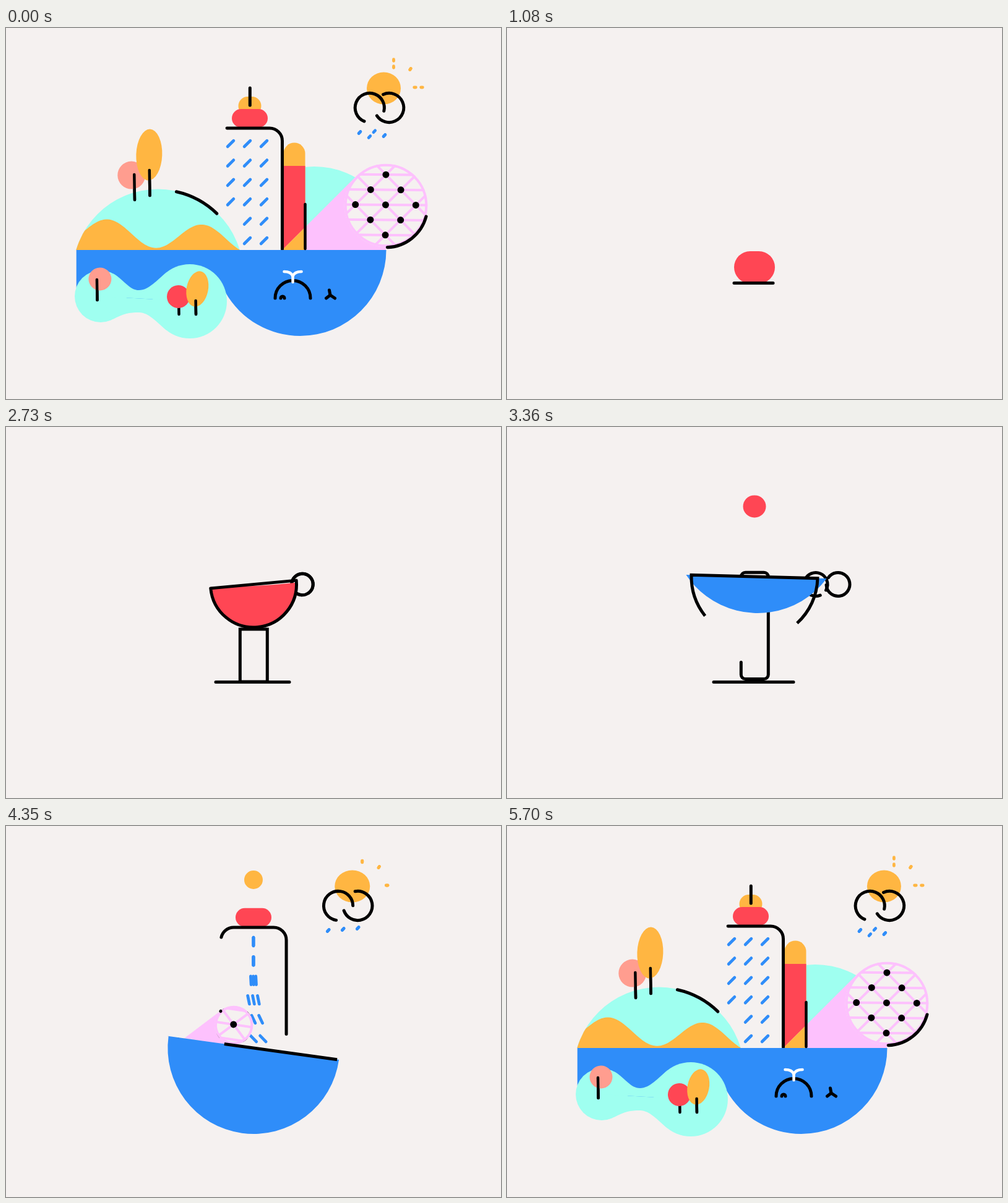
Recreate the animation shown at these times as an HTML page with a canvas. Size 800 by 600 pixels, loop 5730 ms.

```html
<!DOCTYPE html>
<html lang="en">
<head>
<meta charset="utf-8">
<title>Island loop</title>
<style>
  html, body { margin: 0; width: 100%; height: 100%; overflow: hidden; background: #f5f1f0; }
  canvas { display: block; width: 800px; height: 600px; }
</style>
</head>
<body>
<canvas id="stage" width="800" height="600"></canvas>
<script>
const ctx = document.getElementById('stage').getContext('2d');
const LOOP = 5730, PI = Math.PI, TAU = 2 * PI, SEA = 359, HULL = 139;
const BG = '#f5f1f0', BLUE = '#2f8df9', MINT = '#9ffff0', ORANGE = '#ffb642',
      RED = '#ff4654', PINK = '#fdc1fd', SALMON = '#ff9d8f', BLACK = '#000';

// The landscape leaves after the loop point, so its clock runs from 1200 to LOOP + 1200.
let t = 0, spread = 0, settle = 0;

const rad = d => d * PI / 180;
const clamp = (v, a = 0, b = 1) => Math.min(b, Math.max(a, v));
const mix = (a, b, p) => a + (b - a) * p;
const inOut = p => (1 - Math.cos(PI * p)) / 2;
const easeIn = p => p * p;
const easeOut = p => 1 - (1 - p) ** 2;

const ramp = (from, to, ease = inOut) => ease(clamp((t - from) / (to - from)));
// Grows in between two times, shrinks out between two times after the loop point
const shown = (in0, in1, out0, out1) => ramp(in0, in1) - ramp(LOOP + out0, LOOP + out1);
// Landscape poses: start, spread out, settled
const pose = (a, b, c) => mix(mix(a, b, spread), c, settle);
const swing = (start, amp, fade, period) => t < start ? 0
  : amp * Math.exp((start - t) / fade) * Math.cos(TAU * (t - start) / period);

// Value of a short track [time, value, time, value, ...]
function key(track) {
  let v = track[1];
  for (let i = 2; i < track.length; i += 2)
    v = mix(v, track[i + 1], ramp(track[i - 2], track[i]));
  return v;
}

function fill(color, draw) {
  ctx.beginPath(); draw(); ctx.fillStyle = color; ctx.fill();
}
function stroke(color, width, draw, cap = 'round') {
  ctx.beginPath(); draw();
  ctx.strokeStyle = color; ctx.lineWidth = width; ctx.lineCap = cap; ctx.stroke();
}
function line(color, width, x0, y0, x1, y1) {
  stroke(color, width, () => { ctx.moveTo(x0, y0); ctx.lineTo(x1, y1); });
}
// Dash centred on a point
function dash(color, x, y, dx, dy) { line(color, 4.8, x - dx, y - dy, x + dx, y + dy); }
function oval(color, x, y, rx, ry = rx, rot = 0) {
  if (rx > 0 && ry > 0) fill(color, () => ctx.ellipse(x, y, rx, ry, rot, 0, TAU));
}
function pill(color, x, y, w, h) {
  fill(color, () => ctx.roundRect(x - w / 2, y - h / 2, w, h, Math.min(w, h) / 2));
}
function group(draw) { ctx.save(); draw(); ctx.restore(); }
function clipped(path, draw) {
  group(() => { ctx.beginPath(); path(); ctx.clip(); draw(); });
}
function at(x, y, scale, draw) {
  if (scale <= 0.001) return;
  group(() => { ctx.translate(x, y); ctx.scale(scale, scale); draw(); });
}

// Disc below a tilted chord
function segment(color, x, y, r, tilt, level, bulge = 0) {
  group(() => {
    ctx.translate(x, y); ctx.rotate(rad(tilt));
    const a = Math.asin(clamp(level / r, -1, 1));
    fill(color, () => {
      ctx.arc(0, 0, r, a, PI - a);
      ctx.quadraticCurveTo(0, level - 2 * bulge, r * Math.cos(a), level);
    });
  });
}

// The glass swings to rest, then rocks as a boat
const tilt = () => swing(1850, 200, 250, 1534)
  + 7.9 * Math.cos(TAU * (t - 4350) / 900) * (ramp(3000, 4350) - ramp(4350, 4850));
const chordY = () => 254.5 - 12.5 * ramp(3100, 3360) + 117 * ramp(3360, 3700);

function cloud() {
  if (t < 2450 || t > LOOP + 600) return;
  const lift = ramp(3360, 3640), apart = ramp(3000, 3360);
  const x = (t < 4350 ? key([3000, 479, 3360, 517, 3520, 610, 4350, 552.7])
    : 552.7 + 0.0368 * (t - 4350)) + 65 * ramp(LOOP, LOOP + 580, easeIn);
  const r = 19 * ramp(2450, 2800) + 4.6 * lift;
  const gap = 18 * apart - 2.3 * lift;
  const sway = -24 * Math.cos(TAU * (t - 4890) / 1680);
  const sweep = rad(mix(322, 261, lift));
  const ring = (dx, turn) => stroke(BLACK, 5, () => ctx.arc(dx, 0, r, rad(turn), rad(turn) + sweep));

  at(x, mix(254.5, 129, lift), 1 - ramp(LOOP + 400, LOOP + 600, easeIn), () => {
    const sun = ramp(3600, 3900);
    at(7, -31.5, sun, () => {
      oval(ORANGE, 0, 0, pose(28.5, 30, 27.5), 26);
      // Each ray parts into two dashes and joins again
      const ray = (x, y, dx, dy, start, time) => {
        const part = 5.5 * Math.sin(PI * clamp((t - start) / time));
        for (const s of [-part, part]) dash(ORANGE, x + dx * s, y + dy * s, dx * 1.3, dy * 1.3);
      };
      ray(16, -40, 0, -1, 4890, 1680);
      ray(43, -31, 0.57, -0.82, 4350, 1100);
      ray(56, -1.5, 1, 0, 4890, 1680);
    });
    ring(-gap, 88 + sway);
    ring(gap, -90 - sway - 75 * (1 - lift));
    for (let i = 0; i < 3; i++) {
      const start = 5900 - 700 * i;
      for (const wait of [0, 500]) {
        const drop = 12 * ramp(start + wait, start + wait + 300);
        if (sun > 0) dash(BLUE, -32 + 24 * i - drop * 0.67, 40 - 2 * i + drop * 0.75, -1.3 * sun, 1.4 * sun);
      }
    }
  });
}

function ball() {
  const x = t < LOOP ? pose(400, 395, 394) : mix(394, 400, ramp(LOOP + 630, LOOP + 1000));
  const dome = shown(3950, 4200, 300, 500);
  if (dome > 0) {
    const y = key([3950, 148, 4200, 82, 4350, 87, 4650, 126, LOOP + 300, 126, LOOP + 500, 146]);
    pill(ORANGE, x, y, (30 + 7 * ramp(4400, 4650)) * dome, 30 * dome);
  }
  if (t < 1970) {
    const free = ramp(1200, 1300), hop = (t - 1815) / (t < 1815 ? 615 : 200);
    pill(RED, 400, 60 + 327 * hop * hop, 66 - 2 * free, 52 + 12 * free);
  } else if (t > 2850) {
    const grow = ramp(2850, 3000), flat = ramp(3800, 4050);
    const fall = ramp(LOOP + 600, LOOP + 900, easeIn);
    const y = key([2850, 250, 3000, 184, 3700, 78, 4050, 148.5, 4890, 146]);
    pill(RED, x, mix(y, 387, fall), mix(37 * grow + 21 * flat, 66, fall), mix(36 * grow - 6 * flat, 52, fall));
  }
  const mast = shown(4650, 4850, 200, 400);
  if (mast > 0) line(BLACK, 5, x + 0.3, 125, x + 0.3, 125 - 28 * mast);
}

// Stem of the glass, later the outline of the tower
function tower() {
  if (t < 1750 || t > LOOP + 620) return;
  const round = ramp(3100, 3360), widen = ramp(3360, 3700);
  const x = pose(400.3, 392.6, 391.8), half = mix(22, pose(52.8, 54.5, 54.7), widen);
  const x0 = x - half, x1 = x + half;
  const top = 412 - 85 * ramp(1750, 1950) - 163 * ramp(3080, 3600) - 2 * spread;
  const low = mix(412 - 4.5 * round, SEA, widen);
  const r = 7 * round + 13.5 * widen, rLow = 7 * round * (1 - widen);
  const rise = Math.min(27, (low - top) / 2);
  // The line is trimmed at both ends of its path
  const skip = 110 * round + 42 * widen + 29 * spread + 280 * ramp(LOOP + 250, LOOP + 620);
  const tail = (x1 - x0 + rise) * ramp(3400, 3700) + 23 * widen - 21 * spread;
  const length = 2 * (low - top + x1 - x0) - (4 - PI) * (r + rLow);
  const seen = length - skip - tail;
  if (seen <= 0) return;
  group(() => {
    if (round > 0) { ctx.setLineDash([seen, 9999]); ctx.lineDashOffset = -skip; }
    stroke(BLACK, 5, () => {
      ctx.moveTo(x0, low - rise);
      ctx.arcTo(x0, top, x1, top, r);
      ctx.arcTo(x1, top, x1, low, r);
      ctx.arcTo(x1, low, x0, low, rLow);
      ctx.arcTo(x0, low, x0, low - rise, rLow);
      ctx.lineTo(x0, low - rise);
    });
  });
}

function windows() {
  const cx = pose(400, 391, 390);
  for (let row = 0; row < 6; row++) {
    const size = 6.8 * shown(3700 + row * 50, 3850 + row * 50, 200 + row * 40, 380 + row * 40);
    if (size < 0.05) continue;
    const p = clamp((t - 4405 + row * 60) / 430), a = rad(-90 - 135 * p * p);
    for (let col = row > 3 ? 0 : -1; col < 2; col++)
      dash(BLUE, cx + col * 27 * p, 187 + row * 31.4, size * Math.cos(a), size * Math.sin(a));
  }
}

// Right hill, thin tower, cone and lattice disc
function rightSide() {
  clipped(() => ctx.rect(449, 0, 115, SEA), () =>
    oval(MINT, pose(450, 483, 498), SEA, pose(0, 120, 135)));

  const edge = pose(448, 468.5, 483.5);
  const inBand = draw => clipped(() => ctx.rect(449, 0, 100, SEA), () =>
    clipped(() => ctx.roundRect(edge - 35, 185.5, 35, 200, 17.5), draw));
  inBand(() => {
    ctx.fillStyle = ORANGE; ctx.fillRect(440, 180, 60, 200);
    ctx.fillStyle = RED; ctx.fillRect(440, pose(350, 239, 223), 60, 200);
  });

  const grow = ramp(4130, 4330);
  if (grow <= 0) return;
  const r = pose(31, 67, 67.3) * grow;
  const x = pose(362, 605, 614), y = mix(SEA, pose(327, 287, 287), grow);
  const tip = mix(x, pose(286, 434.5, 446.5), grow);
  const dir = Math.atan2(SEA - y, tip - x);
  const open = Math.acos(clamp(r / Math.hypot(tip - x, SEA - y)));
  const cone = () => {
    ctx.moveTo(tip, SEA);
    ctx.lineTo(x + r * Math.cos(dir + open), y + r * Math.sin(dir + open));
    ctx.lineTo(x, y);
    ctx.lineTo(x, SEA);
  };
  fill(PINK, cone);
  inBand(() => fill(ORANGE, cone));

  oval(BG, x, y, r);
  clipped(() => ctx.arc(x, y, r, 0, TAU), () => {
    const step = 24.4;
    ctx.translate(x - 0.5, y - 1);
    ctx.rotate(rad(0.5));
    for (let i = -2; i <= 2; i++) {
      line(PINK, 4, -80, i * step, 80, i * step);
      for (const s of [-80, 80]) line(PINK, 4, 2 * i * step - s, -80, 2 * i * step + s, 80);
    }
    for (let i = -1; i <= 1; i++)
      for (let j = -1; j <= 1; j++) oval(BLACK, (i + j) * step, (i - j) * step, 5.5);
  });
  stroke(PINK, 4, () => ctx.arc(x, y, Math.max(0, r - 2), 0, TAU));
  const turn = rad(pose(220, 102, 15)), arc = rad(pose(0, 70, 73));
  if (arc > 0) stroke(BLACK, 5, () => ctx.arc(x, y + 0.5, r, turn, turn + arc));
}

// A tree stands on its foot; its crown is placed from there
function tree(color, x, y, height, cx, cy, rx, ry, grow, lean = 0) {
  at(x, y, grow, () => {
    ctx.rotate(rad(pose(1, 1, -1)));
    line(BLACK, 4.5, 0, 0, 0, -height);
    oval(color, cx, cy, rx, ry, rad(lean));
    if (-cy < height * 1.25 || ry > 25) line(BLACK, 4.5, 0, 0, 0, -height);
  });
}

function leftHill() {
  const r = 138, x = pose(300, 267.5, 245.5), y = pose(SEA + r, 402.8, 398.5);
  clipped(() => ctx.rect(0, 0, 800, SEA), () => {
    oval(MINT, x, y, r);
    clipped(() => ctx.arc(x, y, r, 0, TAU), () => fill(ORANGE, () => {
      const first = x - 81, base = y - 68;
      ctx.moveTo(x - r, SEA);
      for (let px = x - r; px <= x + r; px += 3)
        ctx.lineTo(px, base + 0.055 * (px - first) - 21 * Math.cos(TAU * (px - first) / 153));
      ctx.lineTo(x + r, SEA);
    }));
  });
  const from = rad(pose(-100, -84.6, -77.4)), arc = rad(pose(0, 31.5, 31.5));
  if (arc > 0) stroke(BLACK, 5, () => ctx.arc(x, y, r - 1, from, from + arc));

  const grow = shown(4580, 4830, 260, 530);
  tree(SALMON, 230 - 22 * settle, 284 - 6 * settle, 41, -4.5, -40, 22.5, 22.5, grow);
  tree(ORANGE, 254.5 - 22 * settle, 277 - 6 * settle, 41, 0, -66, 21, 41.5, grow, 3);
}

// Half disc with a wavy shelf to its left
function sea() {
  const x = pose(400, 467, 475.5), left = pose(261, 137, 113.7);
  const end = rad(pose(180, 148.9, 150.1));
  const depth = (a, b) => pose(SEA, a, b);
  const crest = [pose(261, 290, 297), depth(387, 436)];
  const waves = [[pose(261, 205, 215), depth(430, 442)], [pose(261, 142, 145), depth(391, 420)]];
  const ex = x + HULL * Math.cos(end), ey = SEA + HULL * Math.sin(end);
  const k = 36 * spread;
  fill(BLUE, () => {
    ctx.moveTo(left, SEA);
    ctx.arc(x, SEA, HULL, 0, end);
    ctx.bezierCurveTo(ex - k * Math.sin(-end + PI), ey - k * Math.abs(Math.cos(end)), crest[0] + k, crest[1], ...crest);
    let [px, py] = crest;
    for (const [wx, wy] of waves) {
      const mid = (px + wx) / 2;
      ctx.bezierCurveTo(mid, py, mid, wy, wx, wy);
      [px, py] = [wx, wy];
    }
    ctx.lineTo(left, py);
  });
}

// One disc that parts into two joined by a waist
function island() {
  at(225, 438, ramp(4520, 4800, easeOut), () => {
    ctx.translate(-225, -438);
    const disc = (x, y, r) => ({ x: mix(225, x, settle), y: mix(438, y, settle), r: mix(49.5, r, settle) });
    const a = disc(153, 434, 42), b = disc(297, 442, 60);
    oval(MINT, a.x, a.y, a.r);
    oval(MINT, b.x, b.y, b.r);
    const wx = mix(225, 215, settle), pull = 20 * settle;
    for (const side of [-1, 1]) fill(MINT, () => {
      const wy = mix(438, 442, settle) + side * mix(48, 18, settle);
      const edge = (d, deg, k) => {
        const c = Math.cos(rad(deg)), s = Math.sin(rad(deg));
        return { x: d.x + d.r * c, y: d.y + side * d.r * s, cx: d.x + d.r * c + k * s, cy: d.y + side * (d.r * s - k * c) };
      };
      const p = edge(a, 62, pull), q = edge(b, 128, -pull);
      ctx.moveTo(a.x, a.y);
      ctx.lineTo(p.x, p.y);
      ctx.bezierCurveTo(p.cx, p.cy, wx - pull * 0.8, wy, wx, wy);
      ctx.bezierCurveTo(wx + pull * 0.8, wy, q.cx, q.cy, q.x, q.y);
      ctx.lineTo(b.x, b.y);
    });
  });
  const grow = shown(4620, 4850, 250, 520);
  tree(SALMON, 200.5 - 53 * settle, 440, 33, pose(1, 1, 5), -34, 18.5, 18.5, grow);
  tree(RED, 230 + 49.5 * settle, 463, 15, -0.5, -28.5, 18.5, 18.5, grow);
  tree(ORANGE, 245 + 62 * settle, 463, 22, 3, -41, 17.5, 29, grow, 12 * settle);
}

function whale() {
  at(463.5, 437, shown(5020, 5350, 250, 500), () => {
    stroke(BLACK, 5, () => ctx.arc(0, 0, 28.5, PI, TAU));
    stroke(BLACK, 5, () => ctx.arc(-16.5, 0, 3, PI, TAU));
    line(BLACK, 5, 59, -13, 60.5, -5);
    line(WHITE, 4.5, 0, -26, 0, -36);
    for (const s of [-1, 1]) {
      line(BLACK, 5, 60.5, -5, 61 + 7 * s, 0);
      stroke(WHITE, 4.5, () => {
        ctx.moveTo(0, -36); ctx.quadraticCurveTo(3 * s, -43, 14 * s, -43);
      });
    }
  });
}
const WHITE = '#fff';

function drink() {
  if (t > 1970 && t < 3150) {
    const pour = ramp(1970, 2040), slosh = swing(1930, 42, 400, 600);
    const drop = swing(2040, 12.5, 120, 420) + (t < 2040 ? 12.5 * pour : 0);
    segment(RED, 400, 254.5 + drop, mix(33, 69, pour), slosh,
      -33 * (1 - pour) + 26 * ramp(2700, 3000) + 43 * ramp(3000, 3150), slosh * 0.65 * pour);
  }
  if (t > 3080 && t < 4350) {
    const level = HULL - 59 * ramp(3080, 3360) - 80 * ramp(3360, 3800);
    const a = rad(tilt()), x = 403 - 3 * ramp(3360, 3700);
    segment(BLUE, x + level * Math.sin(a), chordY() - level * Math.cos(a), HULL, tilt(), level);
  }
}

function rim() {
  if (t < 1850 || t > 4590) return;
  const grow = ramp(3030, 3360), full = ramp(3360, 3700), trim = ramp(2980, 3360), gone = ramp(3360, 3600);
  const r = 69.5 * ramp(1850, 2030) + 32.5 * grow + 36 * full;
  const left = rad(90 - 50 * trim - 40 * gone), right = rad(90 - 44 * trim - 46 * gone);
  const bulge = 8 * (1 - ramp(2040, 2300));
  group(() => {
    ctx.translate(pose(400, 467, 475), chordY());
    ctx.rotate(rad(tilt()));
    ctx.lineJoin = t < 3000 ? 'round' : 'miter';
    stroke(BLACK, 5, () => {
      if (left > 0) ctx.arc(0, 0, r, PI - left, PI);
      else ctx.moveTo(key([3700, -138, 4350, -48, 4600, 135]), 0);
      ctx.quadraticCurveTo(0, -2 * bulge, r - 2 * full, 0);
      if (right > 0) ctx.arc(0, 0, r, 0, right);
    }, 'butt');
  });
}

function base() {
  const half = t > LOOP ? 31.5 * ramp(LOOP + 900, LOOP + 1080)
    : (31.5 + 28 * ramp(1200, 1500) + 5 * ramp(3100, 3360)) * (1 - ramp(3450, 3700));
  if (half > 0) line(BLACK, 5, 398.5 - half, 412.5, 398.5 + half, 412.5);
}

// Runs a drawing inside the rocking landscape, which finally slides away
function land(from, draw) {
  if (t < from || t > LOOP + 1000) return;
  const x = pose(400, 467, 475.5), leave = ramp(LOOP, LOOP + 1000, p => p ** 6);
  group(() => {
    ctx.translate(x - 320 * leave, SEA + 420 * leave);
    ctx.rotate(rad(tilt()));
    ctx.translate(-x, -SEA);
    draw();
  });
}

function render(now) {
  t = now % LOOP;
  if (t < 1200) t += LOOP;
  spread = ramp(4350, 4890, p => 1 - (1 - p) ** 3);
  settle = ramp(4890, LOOP, easeOut);
  ctx.fillStyle = BG;
  ctx.fillRect(0, 0, 800, 600);
  cloud();
  windows();
  land(4100, rightSide);
  ball();
  tower();
  base();
  drink();
  land(4350, () => {
    leftHill();
    sea();
    const x = pose(448, 469, 483.5);
    if (spread > 0.2) line(BLACK, 4.5, x, pose(357, 289, 285), x, 357);
    island();
    whale();
  });
  rim();
}

const begin = performance.now();
function tick() {
  render(performance.now() - begin);
  requestAnimationFrame(tick);
}
tick();
</script>
</body>
</html>
```
